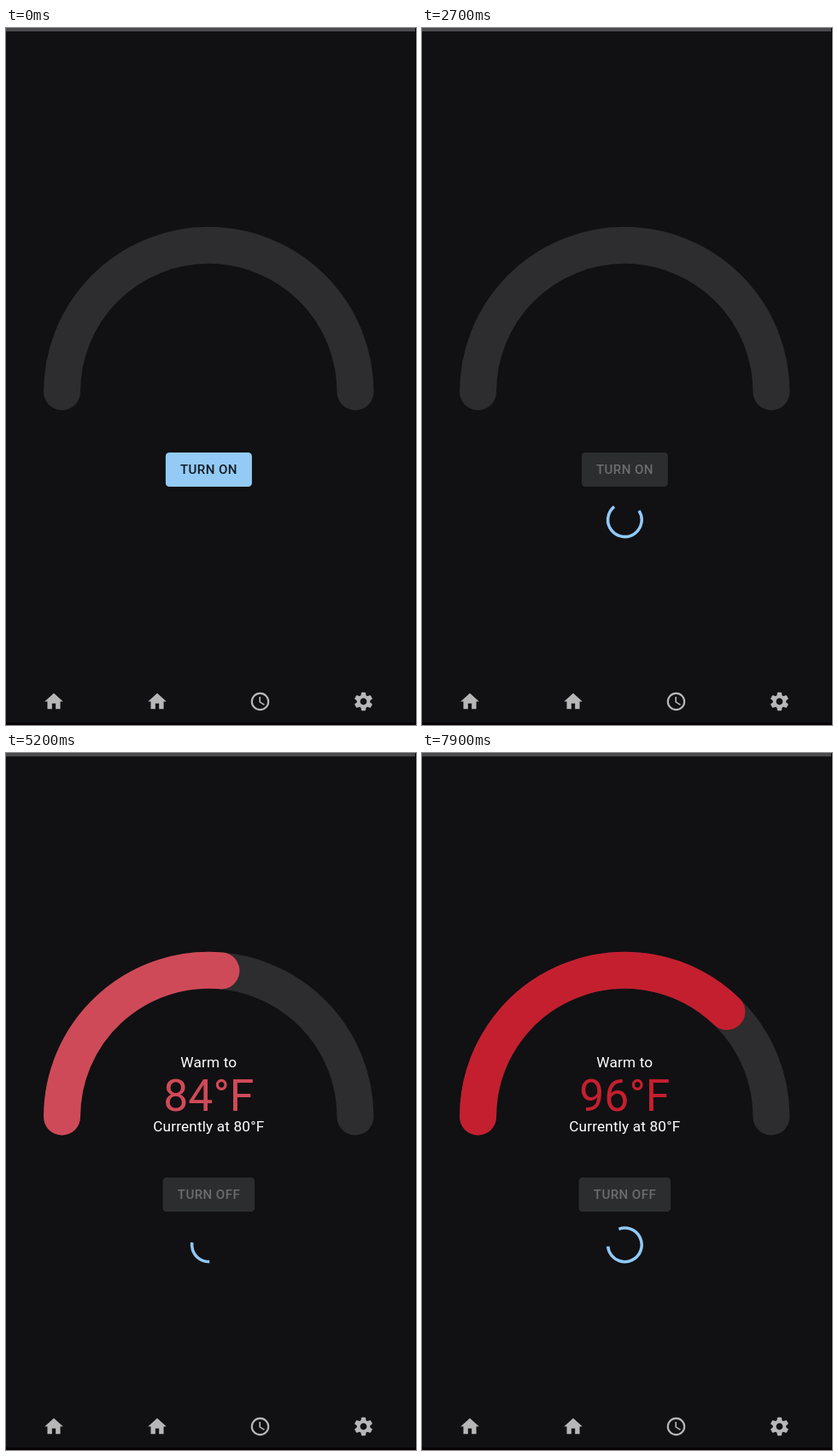
Write an HTML page that moves like this. It is 480 px wide and 816 px high and loops after 8 s.

```html
<!DOCTYPE html>
<html lang="en">
<head>
<meta charset="utf-8">
<title>Thermostat</title>
<style>
  html, body { margin: 0; width: 100%; height: 100%; overflow: hidden; background: #111012; }
  svg { display: block; width: 480px; height: 816px; }
  text { font-family: Roboto, "Noto Sans", sans-serif; text-anchor: middle; fill: #fff; }
  .body { font-size: 17.2px; letter-spacing: .16px; }
  .big { font-size: 51.7px; }
  .caps { font-size: 15.08px; font-weight: 500; letter-spacing: .43px; }
  .arc { fill: none; stroke-width: 43; stroke-linecap: round; }
</style>
</head>
<body>
<svg viewBox="0 0 480 816">
  <defs>
    <path id="home" d="M10 20v-6h4v6h5v-8h3L12 3 2 12h3v8z"/>
    <path id="tooth" d="M-2.9-6L-2.35-9.3Q-2.25-10-1.7-10H1.7Q2.25-10 2.35-9.3L2.9-6z"/>
  </defs>
  <rect width="480" height="816" fill="#111012"/>
  <rect width="479" height="4" fill="#4b4b4d"/>
  <rect x="479" width="1" height="816" fill="#050505"/>
  <rect y="813" width="480" height="3" fill="#070306"/>

  <path class="arc" id="track" stroke="#2d2c2e"/>
  <g id="dial">
    <path class="arc" id="fill"/>
    <circle id="knob" r="8.7" fill="#fff"/>
    <text class="body" id="label" x="237.3" y="368"></text>
    <text class="big" id="temp" x="237.3" y="419"></text>
    <text class="body" x="237.3" y="443">Currently at 80°F</text>
  </g>

  <rect id="button" y="497" height="40" rx="4.3"/>
  <text class="caps" id="caption" x="237.5" y="522"></text>
  <circle id="spinner" r="20.2" fill="none" stroke="#90caf9" stroke-width="3.6"/>

  <g id="nav" fill="#b8b7b8">
    <use href="#home" transform="translate(43.1 775.6) scale(1.077)"/>
    <use href="#home" transform="translate(164.1 775.6) scale(1.077)"/>
    <g transform="translate(297.5 788.5) scale(1.077)">
      <circle r="9" fill="none" stroke="#b8b7b8" stroke-width="2"/>
      <path d="M.5-5H-1v6l5.25 3.15.75-1.23-4.5-2.67z"/>
    </g>
    <g id="gear" transform="translate(418.5 788.5) scale(1.077)">
      <circle r="5.4" fill="none" stroke="#b8b7b8" stroke-width="3.6"/>
    </g>
  </g>
</svg>
<script>
const LOOP = 8000, STEP = 100, FADE = 250, SPIN = 1400;
const MIN = 55, MAX = 110, ROOM = 80;
const CX = 237.25, CY = 426, R = 171.7;

const LIGHT = [147, 203, 246], HOVER = [87, 167, 236], DISABLED = [44, 45, 46];

// [start time, button colour to fade to]
const buttonSteps = [
  [-FADE, LIGHT], [1450, HOVER], [1815, DISABLED], [3050, HOVER],
  [3650, LIGHT], [4915, DISABLED], [6065, LIGHT], [7115, DISABLED]
];
// [start time, set temperature, still being changed]
const tempSteps = [
  [0, 0], [3050, 69, false],
  [4200, 70, true], [4300, 71, true], [4400, 75, true], [4500, 79, true],
  [4600, 83, true], [4800, 84, true], [6065, 84, false],
  [6600, 85, true], [6800, 88, true], [6900, 93, true], [7000, 96, true]
];
const loads = [[1800, 3050], [4915, 6065], [7125, LOOP]];

const $ = id => document.getElementById(id);
const lerp = (a, b, p) => a + (b - a) * p;
const set = (id, attrs) => {
  for (const k in attrs) $(id).setAttribute(k, attrs[k]);
};
const show = (id, on) => set(id, { visibility: on ? "inherit" : "hidden" });

function bezier(x1, y1, x2, y2) {
  const at = (a, b, s) => 3 * (1 - s) ** 2 * s * a + 3 * (1 - s) * s * s * b + s ** 3;
  return x => {
    if (x <= 0) return 0;
    if (x >= 1) return 1;
    let lo = 0, hi = 1;
    for (let i = 0; i < 24; i++) {
      const mid = (lo + hi) / 2;
      if (at(x1, x2, mid) < x) lo = mid; else hi = mid;
    }
    return at(y1, y2, lo);
  };
}
const fadeEase = bezier(.4, 0, .2, 1);
const dashEase = bezier(.42, 0, .58, 1);

function lastStep(steps, t) {
  let i = 0;
  while (i + 1 < steps.length && steps[i + 1][0] <= t) i++;
  return i;
}

function arcPoint(temp) {
  const a = Math.PI * (temp - MIN) / (MAX - MIN);
  return [CX - R * Math.cos(a), CY - R * Math.sin(a)];
}
const arcPath = temp => `M${arcPoint(MIN)}A${R} ${R} 0 0 1 ${arcPoint(temp)}`;

function tint(temp) {
  const far = Math.abs(temp - ROOM) >= 10;
  if (temp < ROOM) return far ? "#1f54ad" : "#5498ec";
  return far ? "#c41f2f" : "#cf4a58";
}

function drawDial(temp, changing, loading) {
  show("dial", temp);
  if (!temp) return;
  const [x, y] = arcPoint(temp), color = tint(temp);
  set("fill", { d: arcPath(temp), stroke: color });
  set("knob", { cx: x, cy: y });
  show("knob", !loading);
  $("label").textContent = (temp < ROOM ? "Cool" : "Warm") + (changing ? "" : "ing") + " to";
  $("temp").textContent = temp + "°F";
  $("temp").style.fill = color;
}

function drawButton(t, on) {
  const i = lastStep(buttonSteps, t);
  const [start, to] = buttonSteps[i];
  const from = i ? buttonSteps[i - 1][1] : to;
  const p = fadeEase((t - start) / FADE);
  const bg = to.map((c, k) => Math.round(lerp(from[k], c, p)));
  const enabled = lerp(+(from !== DISABLED), +(to !== DISABLED), p);
  const white = .3 * (1 - enabled), alpha = white + .87 * enabled;
  const grey = 255 * white / alpha;
  const width = on ? 107.5 : 101;
  set("button", { x: 237.4 - width / 2, width, fill: `rgb(${bg})` });
  $("caption").textContent = on ? "TURN OFF" : "TURN ON";
  $("caption").style.fill = `rgba(${grey},${grey},${grey},${alpha})`;
}

function drawSpinner(load, t) {
  show("spinner", load);
  if (!load) return;
  const u = (t - load[0]) % SPIN / SPIN;
  const grow = dashEase(u * 2), move = dashEase(u * 2 - 1);
  set("spinner", {
    "stroke-dasharray": `${lerp(1, 100, grow)} 200`,
    "stroke-dashoffset": -15 * grow - 110 * move,
    transform: `translate(237.4 575.8) scale(.98) rotate(${360 * u})`
  });
}

function draw(now) {
  const t = Math.floor(now % LOOP / STEP) * STEP;
  const [, temp, changing] = tempSteps[lastStep(tempSteps, t)];
  const load = loads.find(([a, b]) => t >= a && t < b);
  drawDial(temp, changing, load);
  drawButton(t, temp > 0);
  drawSpinner(load, t);
}

set("track", { d: arcPath(MAX) });
for (let a = 0; a < 360; a += 60) {
  $("gear").insertAdjacentHTML("beforeend", `<use href="#tooth" transform="rotate(${a})"/>`);
}

const begin = performance.now();
function tick() {
  draw(performance.now() - begin);
  requestAnimationFrame(tick);
}
tick();
</script>
</body>
</html>
```
